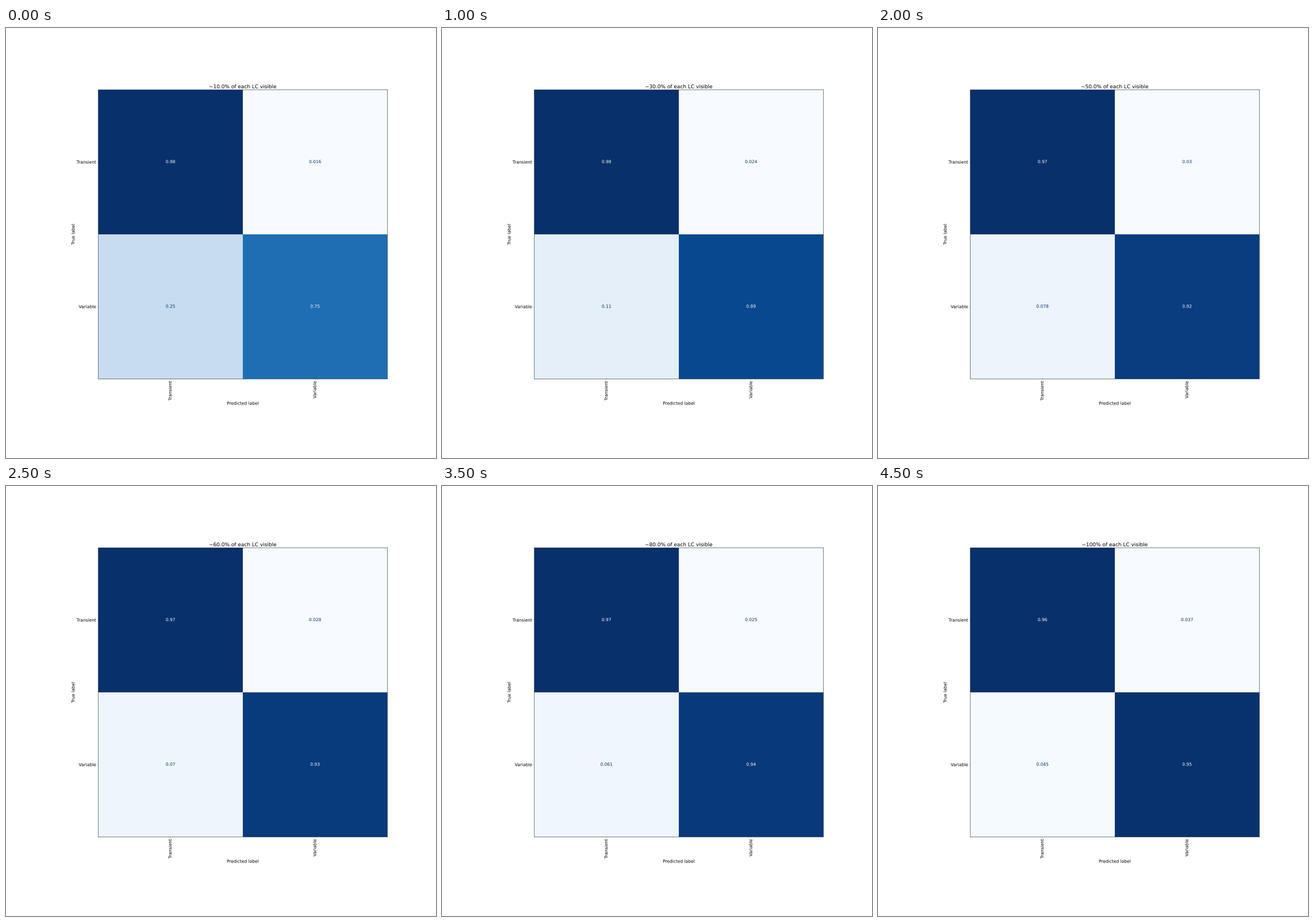
A matplotlib script that plays this animation: 748x748 px, repeating every 5 s.

```python
import matplotlib.pyplot as plt
from matplotlib.animation import FuncAnimation
from matplotlib.patches import Rectangle
from matplotlib.patheffects import Normal

SIZE = 748
INCHES = 25
LEFT, TOP, SIDE = 160.4, 107.4, 503.1
CLASSES = ["Transient", "Variable"]
BLUES = plt.get_cmap("Blues")

# Error rate of each class as more of the light curve becomes visible
MISSED_TRANSIENT = [.016, .016, .024, .028, .030, .028, .026, .0252, .031, .037]
MISSED_VARIABLE = [.25, .16, .11, .089, .078, .07, .07, .061, .061, .0454]
STEPS = len(MISSED_VARIABLE)

plt.rcParams.update({
    "font.family": "DejaVu Sans",
    "font.size": 18,
    "text.hinting": "none",
    "axes.linewidth": .9,
    "axes.labelpad": 4.6,
    "xtick.major.pad": 5,
    "ytick.major.pad": 5,
})

fig = plt.figure(figsize=(INCHES, INCHES), dpi=SIZE / INCHES, facecolor="white")
ax = fig.add_axes([LEFT / SIZE, 1 - (TOP + SIDE) / SIZE, SIDE / SIZE, SIDE / SIZE])
ax.set(xlim=(-.5, 1.5), ylim=(1.5, -.5))
for spine in ax.spines.values():
    spine.set_snap(False)


def smooth(text):
    """Draw text as outlines, so it keeps its sub-pixel position."""
    text.set_path_effects([Normal()])
    return text


def cell(row, col):
    # Each cell reaches the far corner; later cells cover it without a seam
    box = Rectangle((col - .5, row - .5), 2 - col, 2 - row, lw=0, snap=False,
                    clip_on=False)
    ax.add_patch(box)
    return box, smooth(ax.text(col, row, "", ha="center", va="center"))


cells = [cell(row, col) for row in range(2) for col in range(2)]

ax.set_xticks(range(2), CLASSES, rotation="vertical")
ax.set_yticks(range(2), CLASSES)
smooth(ax.set_xlabel("Predicted label"))
smooth(ax.set_ylabel("True label"))
title = smooth(ax.set_title(""))
for label in ax.get_xticklabels() + ax.get_yticklabels():
    smooth(label)


def update(step):
    a, b = MISSED_TRANSIENT[step], MISSED_VARIABLE[step]
    values = [1 - a, a, b, 1 - b]
    low, high = min(values), max(values)
    for (box, text), value in zip(cells, values):
        level = (value - low) / (high - low)
        box.set_facecolor(BLUES(level))
        text.set_text(f"{value:.2g}")
        text.set_color(BLUES(1.0 if level < .5 else 0.0))
    share = 10 * (step + 1)
    shown = f"{share:.1f}" if share < 100 else "100"
    title.set_text(f"~{shown}% of each LC visible")
    return []


anim = FuncAnimation(fig, update, frames=STEPS, interval=500,
                     init_func=lambda: update(0), repeat=True, repeat_delay=0)
plt.show()
```
